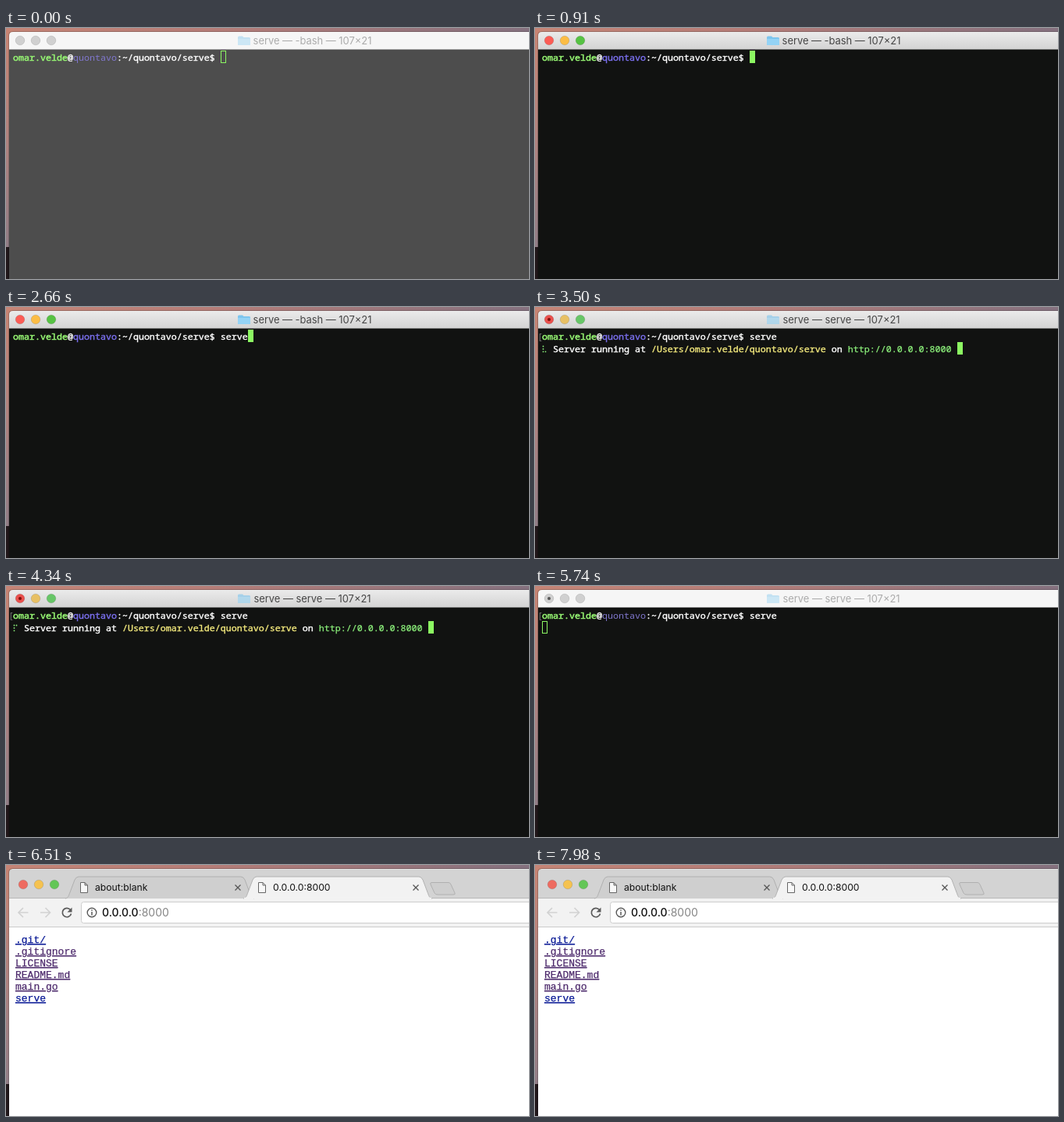
An HTML page for the animation above (8 s loop, 670 by 322 pixels).

```html
<!DOCTYPE html>
<html lang="en">
<head>
<meta charset="utf-8">
<title>Serve demo</title>
<style>
  html, body { margin: 0; width: 100%; height: 100%; overflow: hidden; background: #111; }
  svg { display: block; width: 670px; height: 322px; }
  text { font-family: Inter, Roboto, sans-serif; white-space: pre; }
  .mono text, .mono tspan { fill: currentColor; stroke: currentColor; stroke-width: .4; }
  .mono text { font: 11.667px "Noto Sans Mono", "DejaVu Sans Mono", monospace; color: #fff; }
  .mono .user { color: #96f573; stroke-width: .55; }
  .mono .host { color: #7b70ef; }
  .mono .path { color: #f1e77c; }
  .mono .url { color: #8df27c; stroke-width: .25; }
  .mono .mark { color: #777; stroke-width: 0; }
  .idle .host { color: #8178cf; stroke-width: 0; }
  .list text { font: 13px "Liberation Mono", monospace; text-decoration: underline; fill: currentColor; stroke: currentColor; stroke-width: .25; }
  .icon { fill: none; stroke: #5a5a5a; stroke-width: 1.7; }
</style>
</head>
<body>
<svg viewBox="0 0 670 322" xmlns="http://www.w3.org/2000/svg">
  <defs>
    <linearGradient id="sky"><stop stop-color="#c58577"/><stop offset=".4" stop-color="#b57d78"/><stop offset="1" stop-color="#85717f"/></linearGradient>
    <linearGradient id="edge" x2="0" y2="1"><stop stop-color="#c78473"/><stop offset=".5" stop-color="#b08380"/><stop offset="1" stop-color="#917d86"/></linearGradient>
    <linearGradient id="bar" x2="0" y2="1"><stop stop-color="#ebebeb"/><stop offset="1" stop-color="#d3d3d3"/></linearGradient>
  </defs>
  <rect width="670" height="6" fill="url(#sky)"/>
  <rect y="3" width="10" height="278" fill="url(#edge)"/>
  <rect y="281" width="5" height="41" fill="#21171a"/>
  <path d="M4 322V10Q4 5 9 5H670" fill="none" stroke="#000" stroke-opacity=".2" stroke-width="2"/>
  <g id="terminal">
    <rect id="screen" x="4" y="24" width="666" height="298"/>
    <path id="titlebar" d="M4 27.500V10Q4 5 9 5H670V27.500Z"/>
    <g id="lights"></g>
    <circle id="dot" cx="18" cy="16" r="2"/>
    <g id="heading">
      <g id="folder">
        <path d="M297 12Q297 10.500 298.500 10.500H303L304.500 12H311.500Q313 12 313 13.500V21Q313 22 312 22H298Q297 22 297 21Z" fill="#7cc5ee"/>
        <path d="M297 14H313V21Q313 22 312 22H298Q297 22 297 21Z" fill="#94d3f5"/>
      </g>
      <text id="title" x="392.500" y="21" font-size="12.900" text-anchor="middle" fill="#454545"></text>
    </g>
    <g id="mono" class="mono">
      <text id="mark" class="mark" x="3" y="42">[</text>
      <text x="9" y="42"><tspan class="user">omar.velde</tspan>@<tspan class="host">quontavo</tspan>:~/quontavo/serve$ <tspan id="typed"></tspan></text>
      <g id="output">
        <g id="spinner" fill="#8df27c"></g>
        <text x="23" y="58">Server running at <tspan class="path">/Users/omar.velde/quontavo/serve</tspan> on <tspan class="url">http://0.0.0.0:8000</tspan></text>
      </g>
    </g>
    <rect id="cursor" stroke="#8cf862"/>
  </g>
  <g id="browser">
    <path d="M4 322V10Q4 5 9 5H670V322Z" fill="#d3d3d3"/>
    <path d="M8 5.500H670" stroke="#e4e4e4"/>
    <g id="chromeLights"></g>
    <rect x="4" y="43" width="666" height="37" fill="#f2f2f2"/>
    <path d="M4 42.500H670" stroke="#b8b8b8"/>
    <g id="tabs"></g>
    <path d="M4 79.500H670" stroke="#cbcbcb"/>
    <rect x="96.500" y="47.500" width="590" height="27" rx="3" fill="#fff" stroke="#cdcdcd"/>
    <path id="back" class="icon" d="M28.500 61H16.500M22 55L16 61L22 67"/>
    <path class="icon" d="M44 61H56M50.500 55L56.500 61L50.500 67" style="stroke:#d2d2d2"/>
    <path class="icon" d="M82.500 57.500A5.700 5.700 0 1 0 83.500 62.500"/>
    <path d="M84.500 54.500V60.500H78.500Z" fill="#5a5a5a"/>
    <circle class="icon" cx="110" cy="61" r="5.800" style="stroke-width:1.400"/>
    <path class="icon" d="M110 60V64.500M110 57.300V58.700" style="stroke-width:1.500"/>
    <text id="address" y="66" font-size="14"></text>
    <rect x="4" y="80" width="666" height="242" fill="#fff"/>
    <g id="list" class="list"></g>
  </g>
</svg>
<script>
const LOOP = 8000;
const ACTIVATE = 910, TYPE_START = 1610, TYPE_STEP = 140, RUN = 3080;
const BLUR = 5670, ERASE = 5740, BROWSER = 5810, TAB_OPEN = 5880, TAB_TIME = 210, LOADED = 6160;
const CELL = 7, COMMAND = 'serve';
const TAB_WIDTH = 242, TAB_PITCH = 228;

const $ = id => document.getElementById(id);
const show = (id, on) => $(id).setAttribute('display', on ? 'inline' : 'none');
const set = (id, attrs) => { for (const k in attrs) $(id).setAttribute(k, attrs[k]); };
const clamp = (v, lo = 0, hi = 1) => Math.max(lo, Math.min(hi, v));

const lights = (x, y, colors) => colors.map((c, i) =>
  `<circle cx="${x + 20 * i}" cy="${y}" r="5.8" fill="${c}" stroke="#000" stroke-opacity=".15" stroke-width=".8"/>`).join('');

const IDLE_LIGHTS = Array(3).fill('#d0d0d0');
const READY_LIGHTS = ['#fb5c55', '#fcbd45', '#56c243'];
const BUSY_LIGHTS = ['#ea504c', '#e8c064', '#67c667'];

$('chromeLights').innerHTML = lights(22, 25, ['#ee6b60', '#f5c250', '#63c657']);

$('list').innerHTML = ['.git/', '.gitignore', 'LICENSE', 'README.md', 'main.go', 'serve'].map((name, i) =>
  `<text x="12" y="${100 + 15 * i}" color="${i % 5 ? '#4d2a6c' : '#0a1a96'}">${name}</text>`).join('');

// Braille glyphs encode their dots as bits: 1-3 left column, 4-6 right column.
function spinner(step) {
  const bits = '⠋⠙⠹⠸⠼⠴⠦⠧⠇⠏'.charCodeAt(step % 10) - 0x2800;
  let dots = '';
  for (let i = 0; i < 6; i++) if (bits >> i & 1)
    dots += `<circle cx="${10.5 + 3 * (i > 2)}" cy="${50.5 + 3.4 * (i % 3)}" r=".9"/>`;
  return dots;
}

function tab(x, width, label, active) {
  const r = x + width;
  const fill = active ? '#f2f2f2' : '#cfcfcf';
  let s = `<path d="M${x} 43C${x + 4} 42 ${x + 4} 40 ${x + 6} 35L${x + 12} 19Q${x + 14} 15 ${x + 17} 15H${r - 17}Q${r - 14} 15 ${r - 12} 19L${r - 6} 35C${r - 4} 40 ${r - 4} 42 ${r} 43" fill="${fill}" stroke="#acacac" stroke-width=".9"/>`;
  if (active) s += `<path d="M${x + 1} 42.500H${r - 1}" stroke="${fill}" stroke-width="1.400"/>`;
  if (width > 190) s +=
    `<path d="M${x + 19.5} 22.500H${x + 25}L${x + 28.5} 26V35.500H${x + 19.5}ZM${x + 25} 22.500V26H${x + 28.5}" fill="#f8f8f8" stroke="#666"/>
     <text x="${x + 38}" y="33" font-size="12.200" fill="#111">${label}</text>
     <path d="M${r - 24.5} 25.500l7 7m0-7l-7 7" stroke="#555" stroke-width="1.300"/>`;
  return s;
}

const newTabButton = x =>
  `<path transform="translate(${x})" d="M2 22.500H24Q26 22.500 27 25L32 36Q33 38 30 38H10Q7 38 6 36L1 25Q0 22.500 2 22.500Z" fill="#cecece" stroke="#adadad" stroke-width=".9"/>`;

function drawTerminal(t) {
  const active = t >= ACTIVATE && t < BLUR;
  const running = t >= RUN;
  const output = running && t < ERASE;
  const typed = clamp(Math.floor((t - TYPE_START) / TYPE_STEP) + 1, 0, COMMAND.length);

  set('screen', { fill: t < ACTIVATE ? '#4d4d4d' : '#111211' });
  set('titlebar', { fill: active ? 'url(#bar)' : '#f6f6f6' });
  set('heading', { opacity: active ? 1 : .42 });
  set('folder', { opacity: active && running ? .6 : 1 });
  set('dot', { fill: active ? '#7b0f0b' : '#555' });
  set('mono', { class: active ? 'mono' : 'mono idle' });
  $('lights').innerHTML = lights(18, 16, !active ? IDLE_LIGHTS : running ? BUSY_LIGHTS : READY_LIGHTS);
  $('title').textContent = `serve — ${running ? 'serve' : '-bash'} — 107×21`;
  $('typed').textContent = COMMAND.slice(0, typed);
  show('dot', running);
  show('mark', running);
  show('output', output);
  if (output) $('spinner').innerHTML = spinner(Math.floor((t - RUN) / 70) + 1);

  const column = output ? 76 : running ? 0 : 38 + typed;
  const inset = active ? 0 : .5;
  set('cursor', {
    x: 9 + CELL * column + inset, y: (running ? 45 : 29) + inset,
    width: CELL - 2 * inset, height: 16 - 2 * inset,
    fill: active ? '#8cf862' : 'none', 'stroke-width': active ? 0 : 1
  });
}

function drawBrowser(t) {
  const opened = t >= TAB_OPEN;
  const grow = 1 - (1 - clamp((t - TAB_OPEN) / TAB_TIME)) ** 2;
  const shift = TAB_PITCH * grow;
  $('tabs').innerHTML = tab(76, TAB_WIDTH, 'about:blank', !opened)
    + (opened ? tab(76 + TAB_PITCH, TAB_WIDTH - TAB_PITCH + shift, '0.0.0.0:8000', true) : '')
    + newTabButton(315 + shift);
  $('address').innerHTML = opened
    ? '<tspan x="123" fill="#111" font-weight="500">0.0.0.0</tspan><tspan fill="#858585">:8000</tspan>'
    : '<tspan x="123" fill="#858585">about:</tspan><tspan fill="#111">blank</tspan>';
  $('back').style.stroke = opened ? '#d2d2d2' : '#5a5a5a';
  show('list', t >= LOADED);
}

function draw(t) {
  const browsing = t >= BROWSER;
  show('terminal', !browsing);
  show('browser', browsing);
  (browsing ? drawBrowser : drawTerminal)(t);
}

const start = performance.now();
function tick() {
  draw((performance.now() - start) % LOOP);
  requestAnimationFrame(tick);
}
tick();
</script>
</body>
</html>
```
